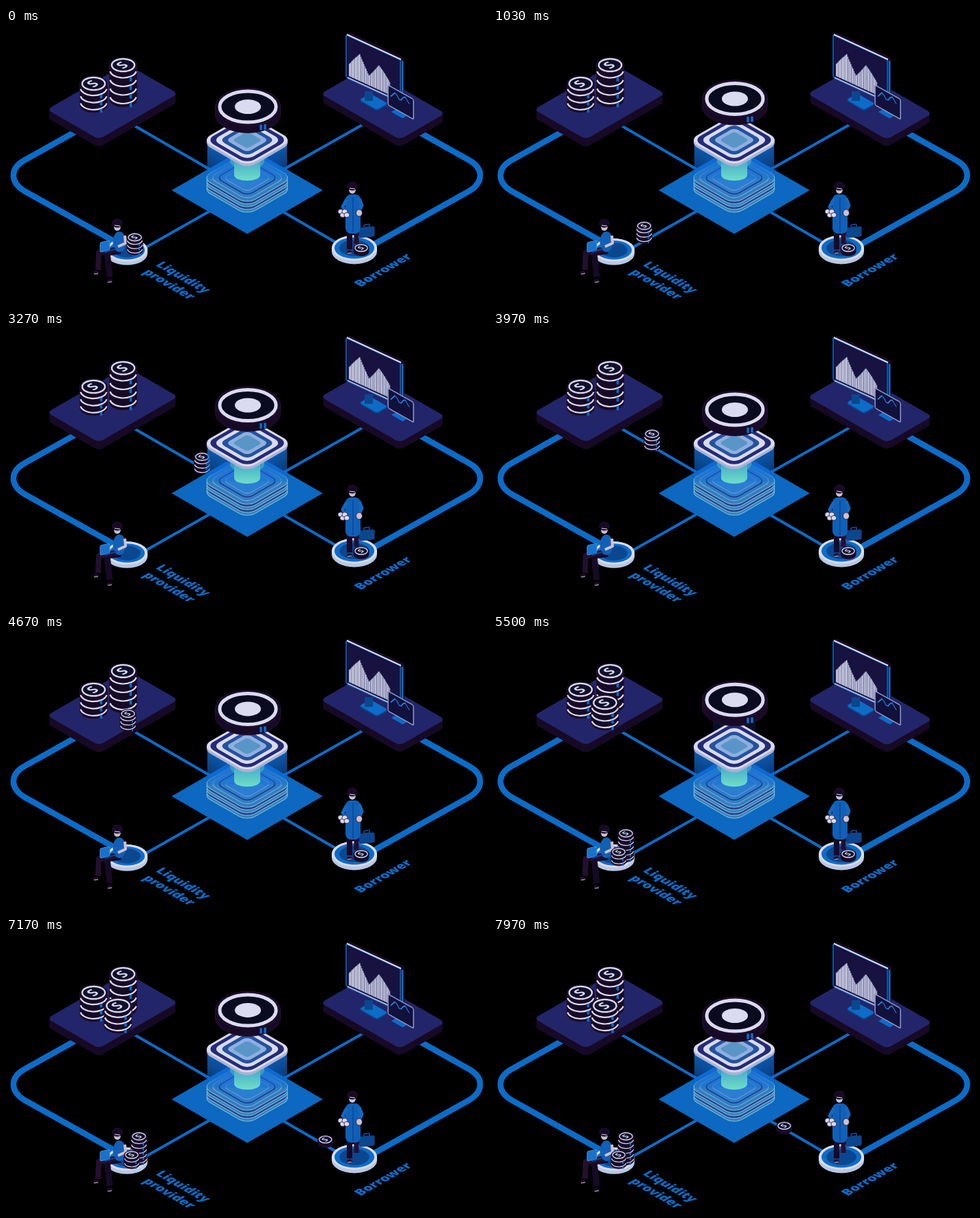
Animation, 700 px wide and 400 px high, one loop 8 s. Source, as an HTML page with a canvas:

```html
<!DOCTYPE html>
<html lang="en">
<head>
<meta charset="utf-8">
<title>Lending flow</title>
<style>
  html, body { margin: 0; width: 100%; height: 100%; overflow: hidden; background: #000; }
  canvas { display: block; width: 700px; height: 400px; }
</style>
</head>
<body>
<canvas id="stage" width="700" height="400"></canvas>
<script>
const c = document.getElementById('stage').getContext('2d');
const LOOP = 8000, BOB = 4000, HANDOVER = 2770;
const BLUE = '#0c6cc8', DEEP = '#0b478f', NAVY = '#23256a', DARK = '#170a26', EDGE = '#240f30';
const WHITE = '#dadaf0', SKIN = '#cfc0d0';

const clamp = v => Math.max(0, Math.min(1, v));
const ramp = (t, a, b) => clamp((t - a) / (b - a));
const smooth = k => k * k * (3 - 2 * k);
const mix = (a, b, k) => a + (b - a) * k;

function paint(fill, stroke, width = 1) {
  if (fill) { c.fillStyle = fill; c.fill(); }
  if (stroke) { c.strokeStyle = stroke; c.lineWidth = width; c.stroke(); }
}

function line(x1, y1, x2, y2, color, width) {
  c.beginPath();
  c.moveTo(x1, y1);
  c.lineTo(x2, y2);
  paint(null, color, width);
}

function oval(x, y, rx, ry, fill, stroke, width) {
  c.beginPath();
  c.ellipse(x, y, rx, ry, 0, 0, Math.PI * 2);
  paint(fill, stroke, width);
}

function cylinder(x, y, rx, ry, h, fill, stroke) {
  c.beginPath();
  c.ellipse(x, y, rx, ry, 0, Math.PI, 0);
  c.ellipse(x, y + h, rx, ry, 0, 0, Math.PI);
  c.closePath();
  paint(fill, stroke);
}

// Rounded rectangle lying on the isometric floor, centred on x, y
function tile(x, y, w, d, r, fill, stroke, width) {
  c.save();
  c.transform(.866, .5, -.866, .5, x, y);
  c.beginPath();
  c.roundRect(-w / 2, -d / 2, w, d, r);
  c.restore();
  paint(fill, stroke, width);
}

function prism(x, y, w, d, r, height, side, top) {
  for (let z = height; z > 0; z--) tile(x, y + z, w, d, r, side);
  tile(x, y, w, d, r, top);
}

// Draws inside an upright plane whose horizontal falls by slope
function wall(x, y, slope, drawing) {
  c.save();
  c.transform(1, slope, 0, 1, x, y);
  drawing();
  c.restore();
}

function panel(x, y, w, h, r, fill, stroke, width) {
  c.beginPath();
  c.roundRect(x, y, w, h, r);
  paint(fill, stroke, width);
}

function floorText(text, x, y, rise, size, color, weight = 800, align = 'left') {
  c.save();
  c.transform(.87, -.5 * rise, .87 * rise, .5, x, y);
  c.font = `${weight} ${size}px "Open Sans", sans-serif`;
  c.textAlign = align;
  c.fillStyle = color;
  c.fillText(text, 0, 0);
  c.restore();
}

function coinFace(x, y, rx) {
  const ry = rx * .55;
  oval(x, y, rx, ry, DARK, EDGE, 1);
  oval(x, y, rx * .83, ry * .83, '#10102c', WHITE, rx * .12);
  floorText('S', x + rx * .22, y + rx * .17, 1, rx * .95, WHITE, 700, 'center');
}

function stack(x, y, rx, h, n, alpha = 1) {
  const ry = rx * .55, step = h / n;
  c.save();
  c.globalAlpha = alpha;
  cylinder(x, y, rx, ry, h, DARK, EDGE);
  for (let i = 0; i < n; i++) {
    const bandY = y + step * (i + .6), tickX = x + rx * .55;
    c.beginPath();
    c.ellipse(x, bandY, rx * .96, ry, 0, .15, Math.PI - .15);
    paint(null, WHITE, rx * .11);
    line(tickX, bandY + ry * .9, tickX, bandY + ry * .9 + step * .5, BLUE, rx * .18);
  }
  coinFace(x, y, rx);
  c.restore();
}

function coin(x, y, rx) {
  cylinder(x, y, rx, rx * .55, rx * .5, DARK, EDGE);
  coinFace(x, y, rx);
}

function tracks() {
  for (const side of [1, -1]) {
    c.save();
    c.translate(350.5, 0);
    c.scale(side, 1);
    c.beginPath();
    c.moveTo(-248, 150);
    c.lineTo(-323, 192);
    c.bezierCurveTo(-345, 204, -345, 224, -324, 237);
    c.lineTo(-186, 314);
    paint(null, BLUE, 8.5);
    c.restore();
  }
  line(185, 141, 482, 313, BLUE, 4);
  line(200, 321, 520, 140, BLUE, 4);
}

function chart() {
  for (let x = 4; x < 64; x += 1.5) {
    const left = 42 - 1.6 * Math.abs(x - 19), right = 39 - 1.3 * Math.abs(x - 47);
    const h = Math.max(left, right, 3) - 3 * (1 + Math.sin(x * 4.3));
    c.fillStyle = Math.sin(x * 7) > 0 ? '#c9c9dd' : '#a3a8c9';
    c.fillRect(x, 58 - h, 1.6, h);
  }
}

function monitor() {
  prism(535, 107, 29, 18, 3, 2, DEEP, BLUE);
  panel(522, 92, 12, 14, 1, DEEP);
  wall(495, 10, .46, () => {
    panel(4, -5, 80, 61, 2, DARK, EDGE, 1);
    panel(0, 0, 79, 62, 2, '#17123f', BLUE, 1.5);
    line(1, -1, 80, -1, WHITE, 2.2);
    line(2, 61, 76, 61, '#a9b9e2', 2);
    line(82, 0, 82, 52, BLUE, 2.5);
    chart();
  });
  tile(572, 125, 19, 7, 1, BLUE);
  wall(556, 83, .56, () => {
    panel(0, 0, 37, 29, 2, '#11113c', '#8795c8', 1.6);
    c.beginPath();
    for (let x = 4; x < 33; x += 3) c.lineTo(x, 11 - x * .15 + 4 * Math.sin(x * .45));
    paint(null, '#2684df', 1.4);
  });
}

function pedestal(x, y, rx) {
  const ry = rx * .56;
  cylinder(x, y, rx, ry, 5, '#b9c8e2');
  oval(x, y, rx, ry, WHITE);
  oval(x, y, rx - 4, ry - 3, BLUE);
  oval(x, y, rx * .66, ry * .64, DEEP);
}

// Two-part arm or leg bending at the middle point
function limb(color, width, x1, y1, x2, y2, x3, y3) {
  c.beginPath();
  c.moveTo(x1, y1);
  c.lineTo(x2, y2);
  c.lineTo(x3, y3);
  paint(null, color, width);
}

function head(x, y) {
  oval(x, y, 5, 6, SKIN);
  cylinder(x, y - 6, 7, 5, 2, DARK, EDGE);
  line(x - 4, y - 2, x + 4, y - 1, WHITE, 1);
}

function shoe(x, y) {
  oval(x, y, 4, 2.5, EDGE);
  line(x - 3, y + 2, x + 3, y + 1, SKIN, 1);
}

function provider() {
  pedestal(176, 323, 30);
  limb(DARK, 9, 167, 324, 147, 327, 151, 362);
  limb(EDGE, 8, 162, 322, 135, 327, 134, 352);
  shoe(151, 368);
  shoe(131, 356);
  oval(165, 311, 9.5, 15, '#1260b4');
  limb(SKIN, 4, 173, 302, 174, 313, 163, 318);
  head(162, 289);
  wall(137, 312, -.2, () => panel(0, 0, 14, 14, 2, '#1672cc', '#4f8fd8', 1));
  line(144, 326, 160, 321, DEEP, 2);
}

function borrower() {
  pedestal(507, 320, 33);
  wall(514, 291, -.1, () => {
    panel(0, 0, 22, 14, 2, DEEP, '#1a3d85', 1.2);
    panel(7, -4, 8, 4, 1, null, '#1a3d85', 2);
  });
  line(500, 290, 500, 322, DARK, 8);
  line(510, 290, 510, 314, EDGE, 7);
  shoe(500, 326);
  panel(494, 242, 22, 57, 8, '#1060b8');
  line(505, 246, 505, 297, DEEP, 1.5);
  limb('#1468c0', 5, 496, 249, 490, 260, 495, 268);
  limb('#1468c0', 5, 514, 248, 518, 258, 513, 268);
  for (let i = 0; i < 4; i++) oval(487 + i * 3, 267 + (i % 2) * 5, 4, 3.5, WHITE, EDGE, .8);
  oval(514, 269, 4.5, 5, SKIN, EDGE, .8);
  head(504, 235);
}

function vault() {
  for (let i = 4; i >= 0; i--) {
    tile(351, 218 + i * 4, 76, 76, 14, i % 2 ? '#283f92' : '#357fba', '#72b8d4', 1.2);
  }
  for (let i = 0; i < 3; i++) tile(351, 218, 64 - i * 12, 64 - i * 12, 11 - i * 2, null, i % 2 ? NAVY : '#7fa9d0', 1.4);

  const glass = c.createLinearGradient(0, 166, 0, 240);
  glass.addColorStop(0, 'rgba(16,108,206,.85)');
  glass.addColorStop(1, 'rgba(16,108,206,.15)');
  prism(351, 166, 76, 76, 14, 52, 'rgba(16,108,206,.012)', null);
  c.fillStyle = glass;
  c.fillRect(293, 163, 116, 56);

  const glow = c.createLinearGradient(0, 190, 0, 222);
  glow.addColorStop(0, '#3fa6cc');
  glow.addColorStop(1, '#70dfc6');
  cylinder(351, 188, 25, 11, 6, '#3b9bc5');
  cylinder(351, 196, 19, 8, 18, glow);

  prism(351, 163, 76, 76, 14, 4, '#a9b2d4', WHITE);
  const rings = ['#232b74', WHITE, '#24529f', '#8fb0dc', '#5a95c8'];
  rings.forEach((color, i) => {
    const size = 69 - i * 11;
    tile(351, 163, size, size, size * .18, color);
  });
}

function token(x, y) {
  cylinder(x, y, 47.5, 27, 11, DARK, EDGE);
  for (const dx of [19, 25]) line(x + dx, y + 28 - dx * .1, x + dx, y + 36 - dx * .1, BLUE, 3.5);
  oval(x, y, 47, 27, DARK, EDGE, 1);
  oval(x, y, 41, 22.5, '#0b0b20', WHITE, 5);
  oval(x, y, 19, 10.5, WHITE);
}

function beam(y, lift) {
  c.fillStyle = `rgba(20,34,92,${.8 * (lift / 22) ** 4})`;
  c.fillRect(320, y, 62, 30);
}

// In along one track, through the vault, out along the other, then grows
function deposit(t) {
  const inward = ramp(t, 410, HANDOVER), outward = ramp(t, HANDOVER, 4860);
  const x = outward ? mix(324, 163, outward) : mix(187.5, 311, inward);
  const y = outward ? mix(207, 107, outward) : mix(304.5, 241, inward);
  const grow = smooth(ramp(t, 4660, 5000));
  const alpha = ramp(Math.abs(t - HANDOVER), 60, 330);
  stack(x, mix(y, 100, grow), mix(11.5, 20, grow), mix(19, 29, grow), 3, alpha);
}

function rewards(t) {
  const alpha = ramp(t, 5200, 5500);
  stack(193.5, 290, 11.5, 35, 5, alpha);
  stack(183, 317, 11, 14, 2, alpha);
}

function draw(t) {
  c.fillStyle = '#000';
  c.fillRect(0, 0, 700, 400);
  c.lineJoin = 'round';
  tracks();
  prism(155, 107, 87, 133, 7, 12, DARK, NAVY);
  stack(170.5, 54, 20, 50, 4);
  stack(127.5, 81, 20, 31, 3);
  prism(548.5, 110, 133, 76, 7, 11, DARK, NAVY);
  monitor();
  tile(351, 236, 127, 127, 0, '#0c68c0');

  provider();
  rewards(t);
  deposit(t);

  const lift = 22 * Math.sin(Math.PI * t / BOB) ** 2;
  beam(134 - lift, lift);
  vault();
  token(352, 114.5 - lift);

  borrower();
  const travel = Math.max(0, t - 6155) * .0513;
  coin(517 - travel, 320 - travel * .487, 11);

  floorText('Liquidity', 217, 345, -1, 18, BLUE);
  floorText('provider', 198, 356, -1, 18, BLUE);
  floorText('Borrower', 516, 377, 1, 18, BLUE);
}

function frame() {
  draw(performance.now() % LOOP);
  requestAnimationFrame(frame);
}
frame();
</script>
</body>
</html>
```
